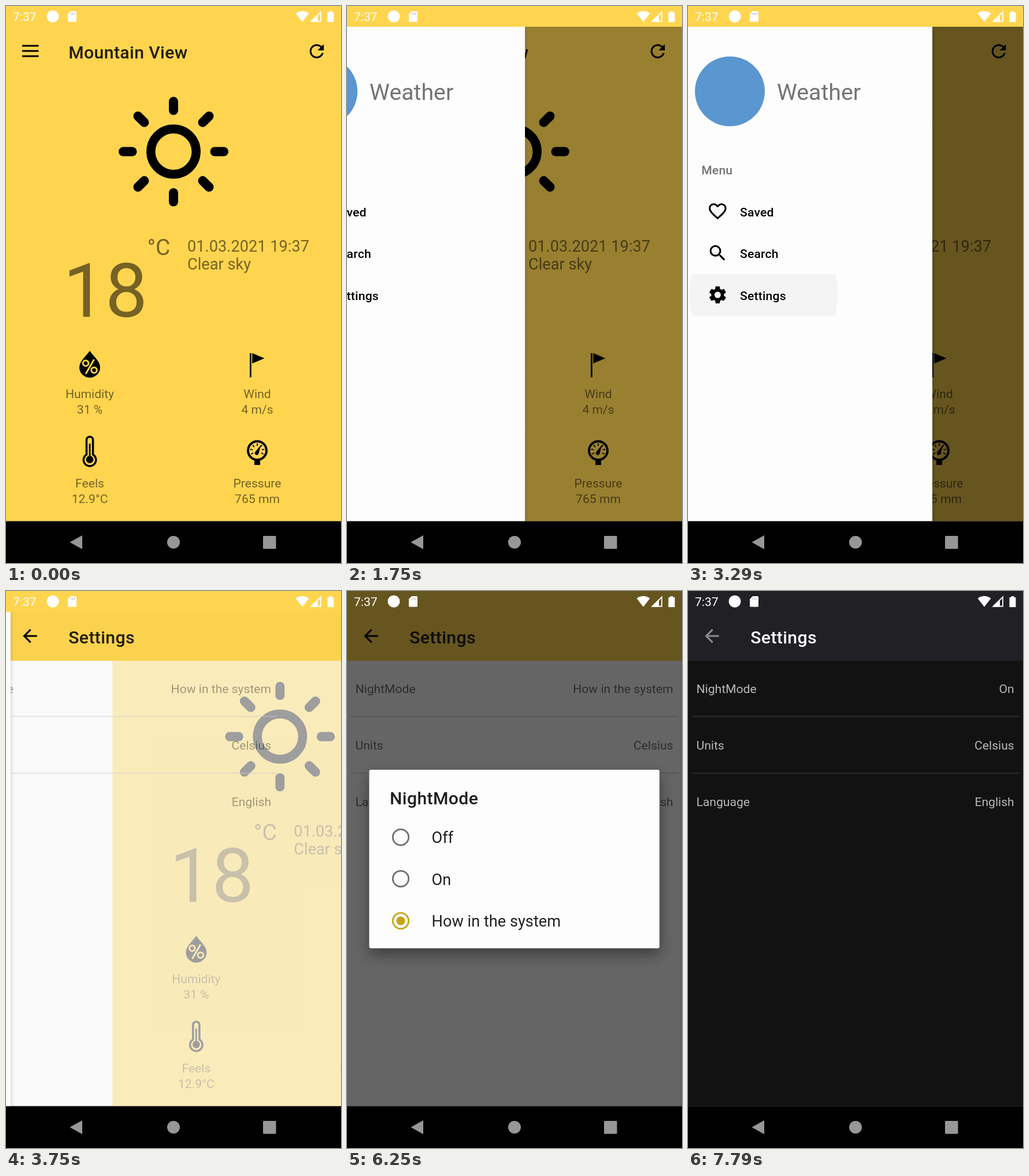
An HTML page for the animation above (8000 ms loop, 580x966 px).

```html
<!DOCTYPE html>
<html lang="en">
<head>
<meta charset="utf-8">
<title>Weather app</title>
<style>
  html, body { margin: 0; width: 100%; height: 100%; overflow: hidden; background: #000; }
  svg { display: block; width: 100vw; height: 100vh; }
  text { font-family: Roboto, "Noto Sans", sans-serif; font-size: 21.1px; white-space: pre; }
  .mid { text-anchor: middle; }
  .end { text-anchor: end; }
  .med { font-weight: 500; letter-spacing: .01em; }
  .title { font-size: 30.2px; font-weight: 500; letter-spacing: .0125em; }
  .big { font-size: 27.2px; }
  .soft { fill: #000; fill-opacity: .54; }
</style>
</head>
<body>
<script>
const LOOP = 8000;
const YELLOW = '#ffd54f', PAPER = '#fdfdfd', GOLD = '#c8a415';
const DRAWER_W = 423, TOP = 36, BAR = 121, BOTTOM = 893.6;

// Markup helpers
const rect = (x, y, w, h, fill, more = '') =>
  `<rect x="${x}" y="${y}" width="${w}" height="${h}" fill="${fill}" ${more}/>`;
const disc = (x, y, r, fill, more = '') =>
  `<circle cx="${x}" cy="${y}" r="${r}" fill="${fill}" ${more}/>`;
const ring = (x, y, r, color, w) =>
  disc(x, y, r, 'none', `stroke="${color}" stroke-width="${w}"`);
const path = (d, fill, more = '') => `<path d="${d}" fill="${fill}" ${more}/>`;
const line = (d, color, w, cap = 'butt') =>
  path(d, 'none', `stroke="${color}" stroke-width="${w}" stroke-linecap="${cap}"`);
const text = (x, y, str, cls, more = '') =>
  `<text x="${x}" y="${y}" class="${cls}" ${more}>${str}</text>`;
const group = (id, body) => `<g id="${id}">${body}</g>`;
const icon = (cx, cy, d, fill = '#000', s = 1.53) =>
  path(d, fill, `transform="translate(${cx} ${cy}) scale(${s}) translate(-12 -12)"`);
const clip = (id, x, y, w, h) =>
  `<clipPath id="${id}">${rect(x, y, w, h, '#000')}</clipPath>`;

const ICONS = {
  back: 'M20 11H7.83l5.59-5.59L12 4l-8 8 8 8 1.41-1.41L7.83 13H20z',
  refresh: 'M17.65 6.35C16.2 4.9 14.21 4 12 4c-4.42 0-7.99 3.58-7.99 8s3.57 8 7.99 8c3.73 0 6.84-2.55 7.73-6h-2.08c-.82 2.33-3.04 4-5.65 4-3.31 0-6-2.69-6-6s2.69-6 6-6c1.66 0 3.14.69 4.22 1.78L13 11h7V4z',
  heart: 'M16.5 3c-1.74 0-3.41.81-4.5 2.09C10.91 3.81 9.24 3 7.5 3 4.42 3 2 5.42 2 8.5c0 3.78 3.4 6.86 8.55 11.54L12 21.35l1.45-1.32C18.6 15.36 22 12.28 22 8.5 22 5.42 19.58 3 16.5 3zm-4.4 15.55l-.1.1-.1-.1C7.14 14.24 4 11.39 4 8.5 4 6.5 5.5 5 7.5 5c1.54 0 3.04.99 3.57 2.36h1.87C13.46 5.99 14.96 5 16.5 5c2 0 3.5 1.5 3.5 3.5 0 2.89-3.14 5.74-7.9 10.05z',
  search: 'M15.5 14h-.79l-.28-.27A6.47 6.47 0 0 0 16 9.5 6.5 6.5 0 1 0 9.5 16c1.61 0 3.09-.59 4.23-1.57l.27.28v.79l5 4.99L20.49 19zm-6 0a4.5 4.5 0 1 1 0-9 4.5 4.5 0 0 1 0 9z',
  gear: 'M19.14 12.94c.04-.3.06-.61.06-.94s-.02-.64-.07-.94l2.03-1.58a.49.49 0 0 0 .12-.61l-1.92-3.32a.49.49 0 0 0-.59-.22l-2.39.96a7 7 0 0 0-1.62-.94l-.36-2.54a.48.48 0 0 0-.48-.41h-3.84a.47.47 0 0 0-.47.41l-.36 2.54c-.59.24-1.13.57-1.62.94l-2.39-.96a.48.48 0 0 0-.59.22L2.74 8.87a.47.47 0 0 0 .12.61l2.03 1.58a7 7 0 0 0 0 1.88l-2.03 1.58a.49.49 0 0 0-.12.61l1.92 3.32c.12.22.37.29.59.22l2.39-.96c.5.38 1.03.7 1.62.94l.36 2.54c.05.24.24.41.48.41h3.84c.24 0 .44-.17.47-.41l.36-2.54a7 7 0 0 0 1.62-.94l2.39.96c.22.08.47 0 .59-.22l1.92-3.32a.47.47 0 0 0-.12-.61zM12 15.6a3.6 3.6 0 1 1 0-7.2 3.6 3.6 0 0 1 0 7.2z'
};

function sun() {
  let rays = '';
  for (let i = 0; i < 8; i++)
    rays += `<g transform="rotate(${i * 45} 290 252.5)">${line('M290 165.5V181', '#000', 16, 'round')}</g>`;
  return ring(290, 252.5, 39.2, '#000', 15.5) + rays;
}

function details() {
  const cell = (x, y, name, value) =>
    text(x, y, name, 'soft mid') + text(x, y + 27, value, 'soft mid');
  const drop = path('M145 598C138 608 127 616 127 627a18 17.5 0 0 0 36 0C163 616 152 608 145 598z', '#000') +
    ring(138, 619.5, 4.8, YELLOW, 2.9) + ring(152.5, 631.5, 4.8, YELLOW, 2.9) +
    line('M152.5 613L138 638', YELLOW, 2.9);
  const flag = rect(422, 602, 2.8, 42, '#000') + path('M426.3 602L447.5 611 426.3 620z', '#000');
  const tube = path('M137.7 752.5a7.3 7.3 0 0 1 14.6 0V777a12.5 12.5 0 1 1-14.6 0z', '#000') +
    path('M141.2 752.5a3.8 3.8 0 0 1 7.6 0V779a9 9 0 1 1-7.6 0z', YELLOW) +
    line('M145 759V784', '#000', 2.8) + disc(145, 786.5, 6.4, '#000');
  let ticks = '';
  for (let a = -120; a <= 120; a += 40)
    ticks += `<g transform="rotate(${a} 435 771)">${line('M435 758.5V763', '#000', 1.8)}</g>`;
  const gauge = ring(435, 771, 16, '#000', 4) + rect(430, 786, 10, 10, '#000') + ticks +
    path('M441.5 761L437.5 776A3.4 3.4 0 1 1 431.8 773z', '#000');
  return drop + flag + tube + gauge +
    cell(145, 680, 'Humidity', '31 %') + cell(435, 680, 'Wind', '4 m/s') +
    cell(145, 835, 'Feels', '12.9°C') + cell(435, 835, 'Pressure', '765 mm');
}

const home = rect(0, BAR, 580, BOTTOM - BAR, YELLOW) + sun() +
  text(98.9, 539, '18', 'soft', 'style="font-size:130px"') +
  text(244.5, 432, '°C', 'soft', 'style="font-size:39px"') +
  text(314, 426, '01.03.2021 19:37', 'soft big') +
  text(314, 456.5, 'Clear sky', 'soft big') + details();

const barTitle = (str, color) => text(108.2, 90.5, str, 'title', `fill="${color}"`);

function settings(mode, color, rule) {
  const row = (y, name, value) => text(14.5, y, name, '') + text(564.7, y, value, 'end');
  return `<g fill="${color}">` + row(177, 'NightMode', mode) +
    row(275, 'Units', 'Celsius') + row(373, 'Language', 'English') + '</g>' +
    line('M6 217.5H574M6 316H574', rule, 1.4);
}

const ripple = (id, area) =>
  `<g clip-path="url(#${area})"><circle id="${id}" r="0"/></g>`;

function drawer() {
  const item = (y, name, shape) => icon(51.3, y - 8.5, ICONS[shape]) + text(90, y, name, 'med');
  return rect(DRAWER_W, TOP, 6, BOTTOM - TOP, 'url(#edge)') +
    rect(0, TOP, DRAWER_W, BOTTOM - TOP, PAPER) +
    ripple('itemRipple', 'itemArea') +
    disc(72.5, 148, 60.5, '#5a96cf') +
    text(154, 163, 'Weather', 'soft', 'style="font-size:39.3px"') +
    text(23.2, 292, 'Menu', 'soft med') +
    item(364.5, 'Saved', 'heart') + item(437, 'Search', 'search') + item(509.5, 'Settings', 'gear');
}

function dialog() {
  const option = (y, name) => text(146.5, y, name, 'big', 'fill="#212121"');
  const off = y => ring(93, y, 13.7, '#707070', 2.8);
  const on = y => ring(93, y, 13.7, GOLD, 2.8) + disc(93, y, 7.6, GOLD);
  return rect(38.5, 310, 502.5, 309.5, PAPER, 'rx="3" filter="url(#shadow)"') +
    ripple('optionRipple', 'optionArea') +
    text(74, 370, 'NightMode', 'title', 'fill="#1f1f1f"') +
    option(437, 'Off') + option(509.5, 'On') + option(582, 'How in the system') +
    off(427) + group('oldPick', off(499) + on(572)) + group('newPick', on(499) + off(572));
}

const status = text(12, 26, '7:37', '', 'fill="#fff"') +
  disc(81, 18, 10.5, '#fff') +
  path('M112 9H120.5Q122 9 122 10.5V26Q122 27.5 120.5 27.5H108.5Q107 27.5 107 26V14z', '#fff') +
  line('M112.5 11.5V15.5M115.7 11.5V15.5M118.8 11.5V15.5', '#bbb', 1.3) +
  path('M513 27.5L501.5 12.8Q513 4.8 524.5 12.8z', '#fff') +
  path('M528.5 26.5H545V10.5z', 'none', 'stroke="#fff" stroke-width="1.8"') +
  path('M527 27.5L540 14.5V27.5z', '#fff') +
  path('M559.5 9H564.5V11H567.5V28H556.5V11H559.5z', '#fff');

const nav = rect(0, BOTTOM, 580, 966 - BOTTOM, '#000') +
  path('M110.5 930L132 918V942z', '#979797') + disc(290, 930, 11, '#979797') +
  rect(445, 919, 22.5, 22.5, '#979797', 'rx="1.5"');

document.body.innerHTML = `<svg viewBox="0 0 580 966"><defs>
  ${clip('itemArea', 0, 465, DRAWER_W, 72.5)}${clip('rowArea', 0, BAR, 580, 96)}
  ${clip('optionArea', 38.5, 463, 502.5, 73)}${clip('body', 0, BAR, 580, BOTTOM - BAR)}
  <linearGradient id="edge"><stop stop-opacity=".1"/><stop offset="1" stop-opacity="0"/></linearGradient>
  <filter id="shadow" x="-15%" y="-15%" width="130%" height="140%">
    <feDropShadow dx="0" dy="11" stdDeviation="12" flood-opacity=".4"/></filter></defs>` +
  rect(0, 0, 580, BOTTOM, PAPER) +
  `<g clip-path="url(#body)">` + group('home', home) +
  ripple('rowRipple', 'rowArea') +
  group('settings', settings('How in the system', 'rgba(0,0,0,.56)', '#d0d0d0')) + '</g>' +
  rect(0, 0, 580, BAR, YELLOW) +
  group('homeBar', line('M28 69H56.5M28 78H56.5M28 87H56.5', '#000', 3) +
    barTitle('Mountain View', '#211c0b') + icon(538, 78.5, ICONS.refresh)) +
  group('setBar', icon(41.5, 78, ICONS.back) + barTitle('Settings', '#211c0b')) +
  rect(0, TOP, 580, BOTTOM - TOP, '#000', 'id="scrim"') +
  group('drawer', drawer()) +
  group('dark', rect(0, 0, 580, BOTTOM, '#121212') + rect(0, 0, 580, BAR, '#212125') +
    icon(41.5, 78, ICONS.back, '#8c8c8c') + barTitle('Settings', '#fff') +
    settings('On', '#b9b9b9', '#333039')) +
  rect(0, 0, 580, BOTTOM, '#000', 'id="dim"') +
  group('dialog', dialog()) + status + nav + '</svg>';

const $ = id => document.getElementById(id);
const set = (id, attrs) => { for (const k in attrs) $(id).setAttribute(k, attrs[k]); };
const show = (id, on) => set(id, { visibility: on ? 'visible' : 'hidden' });

const span = (t, start, length) => Math.min(1, Math.max(0, (t - start) / length));
const mix = (a, b, p) => a + (b - a) * p;
const quint = p => 1 - (1 - p) ** 5;
const smooth = p => .5 - .5 * Math.cos(Math.PI * p);
const decel = p => 1 - (1 - p) ** 2;
const drawerOpen = t => quint(span(t, 1633.5, 512)) - quint(span(t, 3470, 512));

// A touch wave that drifts from the finger to the middle of its row
function wave(id, t, o) {
  const p = decel(span(t, o.at, o.grow));
  const fade = t < o.at ? 0 : 1 - span(t, o.fade, o.out);
  set(id, {
    cx: mix(o.x[0], o.x[1], p), cy: o.y, r: mix(o.r[0], o.r[1], p),
    fill: o.fill, 'fill-opacity': o.alpha * fade
  });
}

function draw(t) {
  const open = drawerOpen(t);
  show('drawer', open > 0);
  set('drawer', { transform: `translate(${(open - 1) * DRAWER_W} 0)` });
  // The shade trails the drawer by one screen refresh
  set('scrim', { opacity: .6 * drawerOpen(t - 16) });
  wave('itemRipple', t, { at: 3290, grow: 200, fade: 3440, out: 150,
    x: [130, 211], y: 501, r: [128, 216], fill: '#000', alpha: .035 });

  const swap = smooth(span(t, 3516, 400));
  set('home', { transform: `translate(${290 * swap} 0)`, opacity: 1 - swap });
  set('settings', { transform: `translate(${290 * (swap - 1)} 0)`, opacity: swap });
  show('homeBar', t < 3516);
  show('setBar', t >= 3516);
  wave('rowRipple', t, { at: 5170, grow: 220, fade: 5300, out: 120,
    x: [465, 290], y: 169, r: [231, 295], fill: '#fffceb', alpha: 1 });

  const enter = decel(span(t, 5690, 190)), leave = span(t, 7530, 190);
  const size = mix(.9, 1, enter);
  show('dialog', enter > 0 && leave < 1);
  set('dialog', {
    opacity: enter * (1 - leave),
    transform: `translate(290 465) scale(${size}) translate(-290 -465)`
  });
  set('dim', { opacity: .6 * enter * (1 - leave) });
  wave('optionRipple', t, { at: 6270, grow: 260, fade: 6540, out: 250,
    x: [230, 290], y: 499.5, r: [60, 255], fill: '#000', alpha: .06 });
  show('oldPick', t < 6500 && enter > 0 && leave < 1);
  show('newPick', t >= 6500 && leave < 1);
  set('dark', { opacity: smooth(span(t, 7530, 240)) });
}

const began = performance.now();
function tick() {
  draw((performance.now() - began) % LOOP);
  requestAnimationFrame(tick);
}
tick();
</script>
</body>
</html>
```
